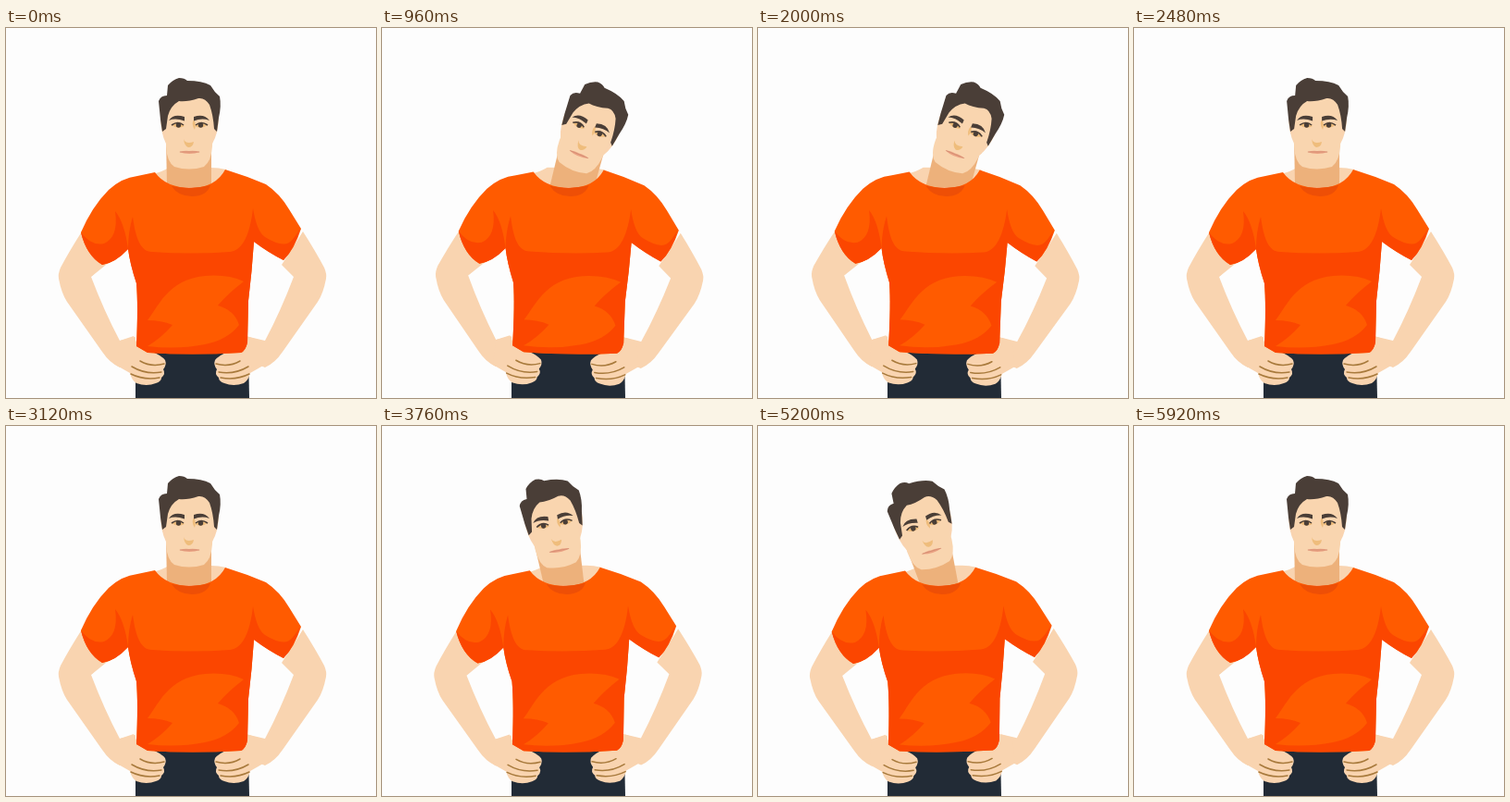
These frames come from a looping animation (400 by 400 pixels, 6 s). An HTML page:

```html
<!DOCTYPE html>
<html lang="en">
<head>
<meta charset="utf-8">
<title>Neck stretch</title>
<style>
html, body { margin: 0; width: 100%; height: 100%; overflow: hidden; background: #fdfdfd; }
svg { display: block; width: 100%; height: 100%; }
.skin { fill: #f9d4b0; }
.shade { fill: #edb17b; }
.face { fill: #f9d5af; }
.gold { fill: #efbd7c; }
.hair { fill: #4a3e37; }
.light { fill: #ff5b00; }
.dark { fill: #fb4600; }
.line { fill: none; stroke: #a87a3c; stroke-width: 1.5; stroke-linecap: round; }
</style>
</head>
<body>
<svg viewBox="0 0 400 400">
  <defs>
    <path id="arm" class="skin" d="M82 220 Q68 242 59 259 Q56 266 57 271 Q60 287 66 296 L104 350 Q112 362 123 367 L140 360 L140 334 L123 338 Q106 306 92 269 L105 256 Z"/>
    <g id="hand">
      <path class="skin" d="M123 338 L138 333 L143 344 L158 350 Q168 354 172 359 Q174 364 170 369 Q173 374 168 378 Q168 382 162 384 Q152 388 141 384 Q136 381 134 373 L120 365 Z"/>
      <path class="line" d="M145 360 Q157 367 171 363 M136 366 Q151 375 168 372 M135 374 Q149 381 166 378"/>
    </g>
  </defs>

  <path fill="#222b36" d="M140 350 H262 L263 400 H140 Z"/>

  <g id="body">
    <use href="#arm"/>
    <path class="skin" d="M92 269 L113 252 L104 250 Z"/>
    <use href="#arm" transform="translate(403 0) scale(-1 1)"/>
    <use href="#hand"/>
    <use href="#hand" transform="translate(398 0) scale(-1 1)"/>

    <path class="skin" d="M158 158 Q168 156 176 151 H222 Q230 151 238 153 L226 176 H176 Z"/>
    <path class="shade" id="neck"/>

    <path class="light" d="M161 156 Q173 173 201 173 Q227 172 237 153 Q260 160 281 169 Q296 179 306 196 L319 217 Q312 239 300 251 Q284 243 268 231 Q266 262 262 295 L261 340 Q259 349 254 351 Q200 354 153 351 L141 344 Q143 300 141 276 Q134 255 132 239 Q118 254 104 256 Q87 246 81 221 Q93 193 111 175 Q125 162 142 160 Z"/>
    <path class="dark" d="M137 204 C140 226 145 242 158 242 Q200 245 242 242 C256 241 264 222 267 195 Q271 220 280 226 Q298 237 306 232 Q312 228 318 216 Q312 239 300 251 Q284 243 268 231 Q266 262 262 295 L261 340 Q259 349 254 351 Q200 354 153 351 L141 344 Q143 300 141 276 Q134 255 132 239 Q132 220 137 204 Z"/>
    <path class="dark" d="M118 198 Q128 210 132 239 Q118 254 104 256 Q87 246 81 221 Q92 236 106 233 Q122 226 118 198 Z"/>
    <path class="light" d="M153 316 C164 303 174 272 215 268 Q240 266 257 274 Q240 287 229 300 Q247 305 252 321 Q240 337 215 342 Q185 348 153 344 Q168 335 180 321 Q168 316 153 316 Z"/>
    <path fill="#ee4f06" d="M179 171 Q200 175 221 170 Q217 182 201 182 Q186 182 179 171 Z"/>

    <g id="head">
      <path class="skin" d="M167 95 Q167 113 173 125 H223 Q230 113 230 95 Z"/>
      <path class="face" d="M173 85 Q180 70 200 72 Q220 72 224 88 L223 128 Q222 144 214 150 Q198 155 182 150 Q174 145 173 128 Z"/>
      <path class="hair" d="M169 112 L167 99 L165 79 Q167 73 174 73 L175 62 Q180 56 187 54 Q193 54 196 57 Q212 57 221 62 Q225 69 231 74 Q233 84 230 97 L228 112 L225 109 Q224 94 220 83 Q215 75 208 76 Q196 80 187 79 Q178 84 175 95 L173 109 Z"/>
      <path class="gold" d="M192 120 Q194 126 203 123 Q202 129 197 129 Q193 128 192 120 Z M203 99 Q206 104 204 110 Q200 104 203 99 Z"/>
      <path class="hair" d="M176 100 Q181 92 193 96 L193 100.5 Q183 97 176 100 Z M203 100.5 V96 Q214 92 220 100 Q212 97 203 100.5 Z"/>
      <path class="gold" d="M179 105 Q186 99 193 106 Q186 110 179 105 Z M204 106 Q211 99 218 105 Q211 110 204 106 Z"/>
      <path fill="none" stroke="#4a3e37" stroke-width="1.6" d="M179 105 Q186 100 192 105 M205 105 Q211 100 218 105"/>
      <circle class="hair" cx="186.5" cy="105" r="2.7"/>
      <circle class="hair" cx="210.5" cy="105" r="2.7"/>
      <path fill="#eba283" d="M187 134 Q194 132 198 133 Q203 132 210 134 Q198 138 187 134 Z"/>
      <path fill="none" stroke="#cf8a70" stroke-width=".7" d="M188 134 H209"/>
    </g>
  </g>
</svg>
<script>
const LOOP = 6000;
const PIVOT = [198, 165];
// [time, head angle]
const STEPS = [
  [0, 0], [480, 0], [960, 22], [2020, 22], [2500, 0],
  [3560, 0], [4060, -29], [4960, -29], [5480, 0], [LOOP, 0]
];
const [body, head, neck] = ["body", "head", "neck"].map(id => document.getElementById(id));

const ease = p => (1 - Math.cos(Math.PI * p)) / 2;

function angleAt(t) {
  const i = STEPS.findIndex(s => s[0] > t);
  const [t0, a0] = STEPS[i - 1], [t1, a1] = STEPS[i];
  return a0 + (a1 - a0) * ease((t - t0) / (t1 - t0));
}

function turn(x, y, deg) {
  const r = deg * Math.PI / 180, c = Math.cos(r), s = Math.sin(r);
  const dx = x - PIVOT[0], dy = y - PIVOT[1];
  return [PIVOT[0] + dx * c - dy * s, PIVOT[1] + dx * s + dy * c];
}

// The top of the neck follows the jaw, the base stays in the collar.
function neckPath(a) {
  const points = [
    turn(173, 118, a), turn(222, 118, a),
    [222 + a * 0.22, 172], [174 + Math.abs(a) * 0.22, 172]
  ];
  return "M" + points.map(p => p.join(" ")).join("L") + "Z";
}

function draw(time) {
  const a = angleAt(time % LOOP);
  body.setAttribute("transform", `rotate(${a / 28} 200 352)`);
  head.setAttribute("transform", `rotate(${a} ${PIVOT})`);
  neck.setAttribute("d", neckPath(a));
}

const start = performance.now();
function tick() {
  draw(performance.now() - start);
  requestAnimationFrame(tick);
}
tick();
</script>
</body>
</html>
```
